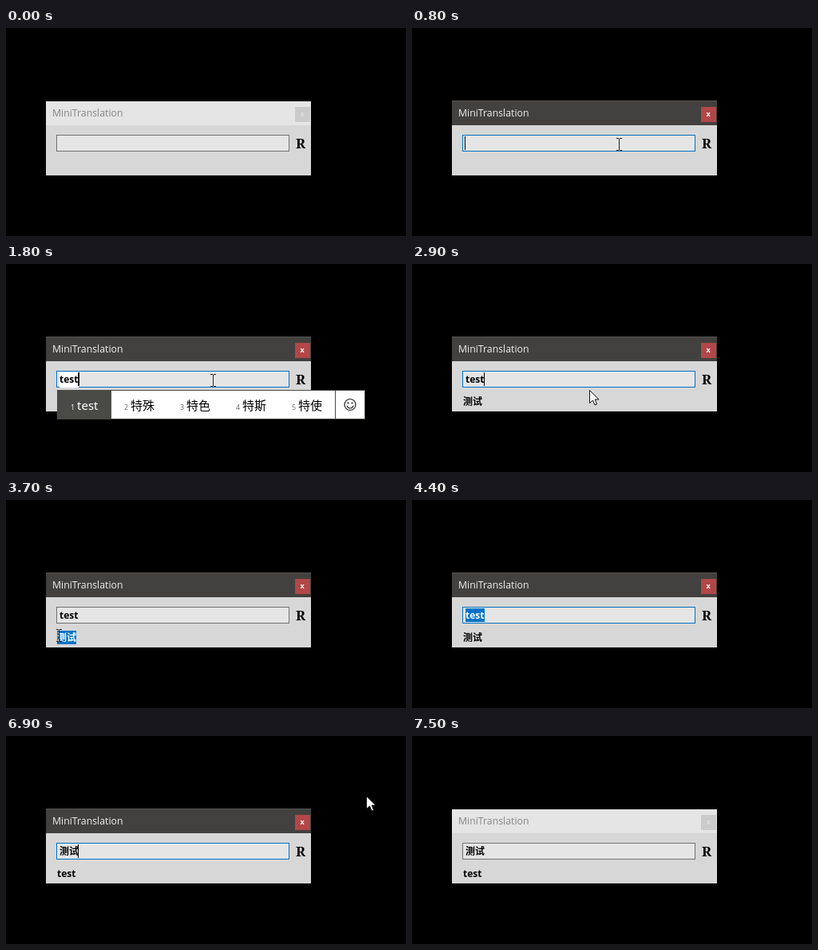
Recreate the animation shown at these times as an HTML page with a canvas. Size 501 by 261 pixels, loop 7600 ms.

```html
<!DOCTYPE html>
<html lang="zh-CN">
<head>
<meta charset="utf-8">
<title>MiniTranslation</title>
<style>
html, body { margin: 0; width: 100%; height: 100%; overflow: hidden; background: #000; }
canvas { display: block; }
</style>
</head>
<body>
<canvas id="stage" width="501" height="261"></canvas>
<script>
const ctx = document.getElementById('stage').getContext('2d');
const LOOP = 7600, STEP = 100, BLINK = 500;
const CJK = '"Noto Sans CJK SC", "Noto Sans CJK", sans-serif';
const SANS = `"Open Sans", ${CJK}`;
const BLUE = '#0072c6', GRAY = '#707070', DARK = '#4a4a46', INK = '#222';

// Moments in ms
const FOCUS = 800, TYPE = 1400, TYPED = 1800, COMMIT = 2000, TRANSLATED = 2200;
const GRAB = 3600, REFOCUS = 4100, PASTE = 4700, RETRANSLATED = 5300, BLUR = 7500;

// Pointer moves; power > 1 starts slowly, a negative power ends slowly.
const moves = [
  { start: 100, end: 800, from: [484, 66], to: [259, 146], power: -2 },
  { start: 800, end: 2900, from: [259, 146], to: [259, 146], power: 1 },
  { start: 2900, end: 3200, from: [222, 158], to: [208, 162], power: -2 },
  { start: 3200, end: 4000, from: [208, 162], to: [-20, 175], power: 1 },
  { start: 5700, end: 6200, from: [23, 140], to: [351, 99], power: -2 },
  { start: 6200, end: 7200, from: [351, 99], to: [510, 61], power: 1.3 }
];

const candidates = {
  t: '他 她 它 太 图',
  te: '特 忑 忒 铽 慝',
  tes: '特殊 特色 特斯 特使 特设',
  test: 'test 特殊 特色 特斯 特使'
};

const within = (t, a, b) => t >= a && t < b;
const ease = (k, power) => power < 0 ? 1 - (1 - k) ** -power : k ** power;
const lerp = (a, b, k) => a.map((v, i) => Math.round(v + (b[i] - v) * k));

function rect(x, y, w, h, color) {
  ctx.fillStyle = color;
  ctx.fillRect(x, y, w, h);
}

function frame(x, y, w, h, color) {
  ctx.strokeStyle = color;
  ctx.lineWidth = 1;
  ctx.strokeRect(x + .5, y + .5, w - 1, h - 1);
}

function text(s, x, y, font, color, align = 'left') {
  ctx.font = font;
  ctx.fillStyle = color;
  ctx.textAlign = align;
  ctx.fillText(s, x, y);
}

function widthOf(s, font) {
  ctx.font = font;
  return Math.ceil(ctx.measureText(s).width - .1);
}

function field(s, x, y, selected) {
  const font = `bold 12px ${SANS}`, w = widthOf(s, font);
  if (selected) rect(x, y - 13, w, 17, BLUE);
  text(s, x, y, font, selected ? '#fff' : '#000');
  return w;
}

function drawWindow(active) {
  rect(50, 92, 332, 93, '#d7d7d7');
  if (active) {
    rect(50, 91, 332, 31, '#43413f');
    rect(50, 91, 332, 1, '#575553');
  } else {
    rect(50, 92, 332, 30, '#e5e5e5');
  }
  text('MiniTranslation', 58, 111, `12.3px ${SANS}`, active ? '#f0f0f0' : '#858585');
  rect(362, 99, 19, 19, active ? '#b24747' : '#cbcbcb');
  text('x', 371, 111, `bold 9px ${SANS}`, active ? '#fff' : '#dedede', 'center');
  text('R', 363, 151, 'bold 17px "Noto Serif", serif', '#000');
}

function enteredText(t) {
  if (t >= PASTE) return '测试';
  return 'test'.slice(0, Math.max(0, (t - TYPE) / STEP + 1));
}

function resultText(t) {
  return t < TRANSLATED ? '' : t < RETRANSLATED ? '测试' : 'test';
}

function caretShown(t) {
  const hidden = within(t, TYPE, TYPED) || within(t, GRAB, PASTE);
  if (hidden || !within(t, FOCUS, BLUR)) return false;
  const since = t >= PASTE ? PASTE : t >= TYPED ? TYPED + STEP : FOCUS;
  return Math.floor(Math.max(0, t - since) / BLINK) % 2 === 0;
}

function borderColor(t) {
  if (!within(t, FOCUS, BLUR)) return GRAY;
  if (t < GRAB || t >= REFOCUS + 300) return BLUE;
  const k = Math.max(0, (t - REFOCUS + STEP) / 400);
  return `rgb(${lerp([112, 112, 112], [0, 114, 198], k)})`;
}

function drawFields(t) {
  const value = enteredText(t), composing = within(t, TYPE, COMMIT);
  rect(63, 134, 292, 21, '#e5e5e5');
  frame(63, 134, 292, 21, borderColor(t));
  const w = widthOf(value, `bold 12px ${SANS}`);
  if (composing) rect(67, 136, w, 19, '#fff');
  field(value, 67, 149, within(t, REFOCUS, PASTE));
  if (within(t, TYPE, TYPED)) {
    for (let x = 67; x < 67 + w; x += 2) rect(x, 153, 1, 1, '#000');
  }
  if (caretShown(t)) rect(66 + w, 136, composing ? 2 : 1, 17, '#000');
  field(resultText(t), 64, 177, within(t, GRAB + STEP, REFOCUS + STEP));
}

function drawSmile(x, y) {
  ctx.strokeStyle = INK;
  ctx.lineWidth = 1.2;
  ctx.beginPath();
  ctx.arc(x, y, 7, 0, 7);
  ctx.moveTo(x + 3.8, y + 1.5);
  ctx.arc(x, y + .5, 4, .25, Math.PI - .25);
  ctx.stroke();
  for (const dx of [-3.4, 1.6]) rect(x + dx, y - 3, 1.8, 1.8, INK);
}

function drawCandidates(key) {
  const font = `15px "Noto Sans", ${CJK}`;
  const words = candidates[key].split(' ');
  const widths = words.map(w => widthOf(w, font) + 40);
  const end = 65 + widths.reduce((a, b) => a + b);
  rect(64, 158, end - 26, 37, '#fff');
  rect(64, 158, widths[0] + 1, 37, DARK);
  let x = 65;
  words.forEach((w, i) => {
    text(i + 1, x + 16, 183, `9px ${SANS}`, i ? '#666' : '#fff');
    text(w, x + 24, 183, font, i ? '#000' : '#fff');
    x += widths[i];
  });
  frame(64, 158, end - 26, 37, DARK);
  rect(end, 158, 1, 37, DARK);
  drawSmile(end + 19, 176.5);
}

function drawBeam(x, y) {
  rect(x, y - 7, 1, 14, INK);
  for (const dy of [-8, 7]) {
    rect(x - 3, y + dy, 3, 1, INK);
    rect(x + 1, y + dy, 3, 1, INK);
  }
}

function drawArrow(x, y) {
  ctx.beginPath();
  [[0, 0], [0, 16], [4, 12.5], [6.5, 18.5], [9, 17.5], [6.7, 11.5], [11.5, 11.5]]
    .forEach(([dx, dy]) => ctx.lineTo(x + .5 + dx, y + .5 + dy));
  ctx.closePath();
  ctx.fillStyle = '#fff';
  ctx.strokeStyle = '#111';
  ctx.lineWidth = 1;
  ctx.fill();
  ctx.stroke();
}

function drawPointer(t) {
  const m = moves.find(m => within(t, m.start, m.end));
  if (!m) return;
  const [x, y] = lerp(m.from, m.to, ease((t - m.start) / (m.end - m.start), m.power));
  const overBox = within(x, 63, 355) && within(y, 134, 155);
  const dragging = within(t, GRAB, REFOCUS);
  (overBox || dragging ? drawBeam : drawArrow)(x, y);
}

function draw(now) {
  const t = Math.floor(now % LOOP / STEP) * STEP;
  rect(0, 0, 501, 261, '#000');
  drawWindow(within(t, FOCUS, BLUR));
  drawFields(t);
  // The list lags one step behind the last letter.
  if (within(t, TYPE, COMMIT)) drawCandidates(t < TYPED ? enteredText(Math.min(t, TYPED - 2 * STEP)) : 'test');
  drawPointer(t);
}

const start = performance.now();
function tick() {
  draw(performance.now() - start);
  requestAnimationFrame(tick);
}
tick();
</script>
</body>
</html>
```
